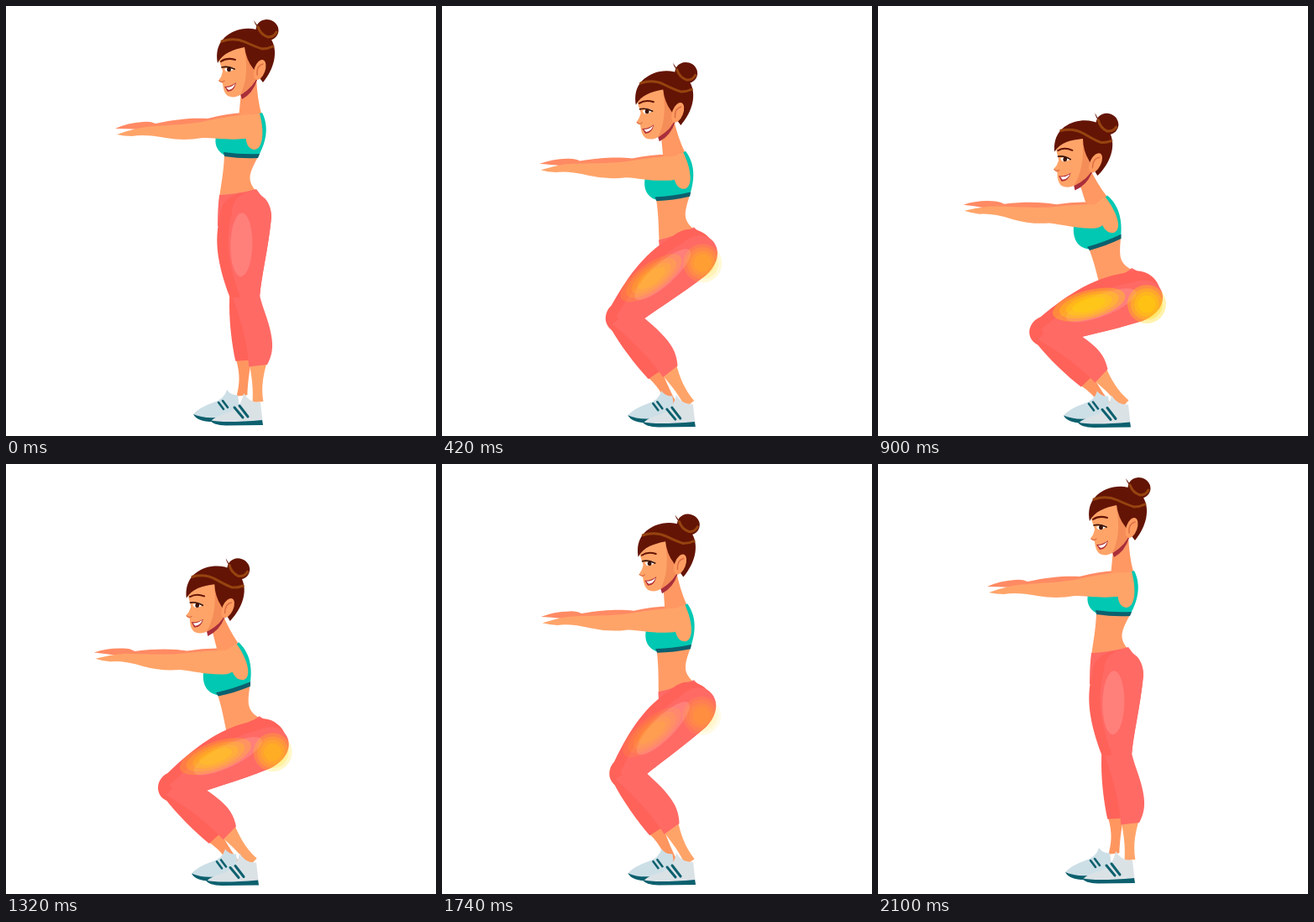
An HTML page with a canvas that plays this animation: 512x512 px, repeating every 2.4 s.

```html
<!DOCTYPE html>
<html lang="en">
<head>
<meta charset="utf-8">
<title>Squat</title>
<style>
html, body { margin: 0; width: 100%; height: 100%; overflow: hidden; background: #fff; }
canvas { display: block; width: 512px; height: 512px; }
</style>
</head>
<body>
<canvas id="stage" width="512" height="512"></canvas>
<script>
const ctx = document.getElementById('stage').getContext('2d');
const LOOP = 2400, STEP = 30, DOWN = 900, RISE = 1200, END = 2100;
const HIP = { x: 286, y: 251 };

const SKIN = '#ffa469', SKIN_FAR = '#ff8a63', SHADE = '#f48d57', HAIR = '#641405', SHINE = '#96430f';
const TEAL = '#00c8b2', DARK = '#0c606e', PANTS = '#ff6a65', PANTS_FAR = '#ff6259';
const LIP = '#b32e33', INK = '#3a1208';

const rad = degrees => degrees * Math.PI / 180;

function fill(color, d) {
  const path = new Path2D(d);
  return () => {
    ctx.fillStyle = color;
    ctx.fill(path);
  };
}

function line(color, width, d) {
  const path = new Path2D(d);
  return () => {
    ctx.strokeStyle = color;
    ctx.lineWidth = width;
    ctx.stroke(path);
  };
}

const oval = (color, x, y, rx, ry, angle = 0) => () => {
  ctx.fillStyle = color;
  ctx.beginPath();
  ctx.ellipse(x, y, rx, ry, rad(angle), 0, 7);
  ctx.fill();
};

const paint = parts => parts.forEach(part => part());

// Runs draw() with the point "from" moved to "to" and turned around it.
function pinned(from, to, degrees, draw) {
  ctx.save();
  ctx.translate(to.x, to.y);
  ctx.rotate(rad(degrees));
  ctx.translate(-from.x, -from.y);
  draw();
  ctx.restore();
}

// Along a bone, x runs from 0 to 100 and positive y is the front of the leg.
function bone(a, b, draw) {
  const dx = b.x - a.x, dy = b.y - a.y;
  ctx.save();
  ctx.translate(a.x, a.y);
  ctx.rotate(Math.atan2(dy, dx));
  ctx.scale(Math.hypot(dx, dy) / 100, 1);
  draw();
  ctx.restore();
}

const farShin = [
  fill('#ff9660', 'M60 19C75 16 85 19 95 24L95 11C80 8 70 4 58 0Z'),
  fill(PANTS_FAR, 'M0 18C20 22 45 22 61 20L62-2L0-2Z')
];
const nearAnkle = [fill(SKIN, 'M66 4C80 3 90 3 103 6L103-7C88-6 75-12 66-17Z')];
const nearShin = [fill(PANTS, 'M0 14C20 8 45 3 68 5L68-17C60-24 52-27 40-26C25-25 15-20 0-18Z')];
const thigh = [
  fill(PANTS_FAR, 'M0 31C30 38 60 33 100 18L100-18C70-20 40-27 0-30C-40-30-40 31 0 31Z'),
  oval(PANTS_FAR, 100, 0, 18, 18),
  fill(PANTS, 'M-5 17C30 25 60 20 104 4L100-18C70-20 40-27 0-30C-40-30-40 17-5 17Z'),
  oval('#ff7f7b', 35, 5, 40, 13)
];

const farShoe = [
  fill('#cddfe6', 'M223 486Q230 478 247 472Q260 468 263 457Q268 464 276 463L280 492L240 493Z'),
  fill(DARK, 'M223 486Q234 491 250 490V495Q228 496 223 486Z'),
  line(DARK, 2.6, 'M253 472l6 8M258 470l6 8')
];
const nearShoe = [
  fill('#dbe2e6', 'M244 494Q250 488 266 484Q280 478 283 461Q290 473 303 472L306 498L250 497Z'),
  fill(DARK, 'M243 493Q258 497 305 493L306 499L262 499.5Q246 499 243 493Z'),
  line(DARK, 3, 'M272 478l10 12M278 476l10 13')
];

const waist = [fill('#ff9c66', 'M260 178C259 200 256 212 254 229L299 222C286 207 289 200 301 178Z')];
const pelvis = [fill(PANTS, 'M254 225Q276 224 298 218C308 230 315 245 315 262L252 262Q252 240 254 225Z')];
const chest = [
  fill('#ff9862', 'M280 102L277 134L304 128Q299 110 298 84Z'),
  fill(SKIN, 'M262 136L303 128Q312 150 301 177H261Z'),
  fill(TEAL, 'M255 143C249 153 245 168 259 177L301 178C309 163 314 145 305 127L302 128C308 150 306 170 296 171C286 170 285 160 285 143Z'),
  fill(DARK, 'M259 174Q280 177 302 176L300 181Q280 182 260 179Z')
];
const farArm = [fill(SKIN_FAR,
  'M130 146Q145 139 163 138Q172 137 178 140C205 134 225 133 240 134Q262 128 285 127V145L180 150L158 147Q142 146 130 146Z')];
const nearArm = [fill(SKIN,
  'M132 153Q146 148 160 145C178 142 215 142 238 137Q270 130 290 129C307 130 306 158 284 158C262 160 250 157 234 157Q212 161 190 157Q165 152 150 155Q140 155 132 153Z')];
const head = [
  fill('#a92e3b', 'M279 105L281 111Q294 104 299 88L297 82Z'),
  fill(SKIN, 'M253 55C252 66 258 74 258 78Q257 84 253 89Q258 91 258 93Q259 103 264 107Q272 111 282 104Q296 94 300 80V45H260Z'),
  fill(SHADE, 'M284 52Q290 84 279 106Q296 96 300 82L296 62Z'),
  fill(HAIR, 'M295 17Q297 24 301 25L299 38H314V20Q304 20 300 24Z'),
  oval(HAIR, 311, 28.5, 13.5, 12.5, 15),
  fill(HAIR, 'M252 68C249 52 254 38 272 30C290 23 308 28 316 40C324 54 320 74 306 91Q302 86 294 74Q286 64 284 49C270 52 258 56 252 68Z'),
  line(SHINE, 3, 'M257 42Q272 37 285 43T305 51Q312 51 318 48M300 25Q303 34 312 37Q319 37 322 31'),
  oval('#ff9c62', 302, 76, 6.5, 12.5, 20),
  line('#dc6e43', 1.5, 'M299 82Q298 71 306 69'),
  line(HAIR, 2, 'M256 66Q263 61 273 64'),
  fill('#fff', 'M260 75Q266 71 272 74Q268 79 262 78Z'),
  oval(INK, 265.5, 75.5, 2.4, 2.7),
  line(INK, 1.7, 'M257 73Q264 71 272 75'),
  line('#db7045', 1.2, 'M254 89Q257 92 260 89'),
  fill(LIP, 'M260 96Q268 96 274 91Q272 102 264 102Z'),
  fill('#fff', 'M262 97Q268 97 273 92.5Q271 99 265 100Z')
];

function glow(x, y, rx, ry, angle, power) {
  for (let size = 1; size > 0.4; size -= 0.18) {
    oval(`rgba(255,215,0,${0.33 * power})`, x, y, rx * size, ry * size, angle)();
  }
}

function draw(time) {
  const t = Math.floor(time % LOOP / STEP) * STEP;
  const rise = end => Math.max(0, (END - t) / (END - end));
  const p = t < DOWN ? t / DOWN : Math.min(1, rise(RISE));
  const power = t < DOWN ? p : rise(DOWN);

  // The hip sinks evenly; a straight knee opens fast, then settles.
  const bend = Math.sin(Math.PI / 2 * p ** 0.6);
  const hip = { x: HIP.x + 18 * p, y: HIP.y + 96 * p * (1.1 - 0.1 * p) };
  const knee = { x: 284 - 84 * bend, y: 346 + 41 * p * (1.5 - 0.5 * p) };
  const ankle = { x: 299 - 8 * bend, y: 468 + 4 * bend };
  const lean = -23 * p;
  const torso = parts => pinned(HIP, hip, lean, () => paint(parts));
  const shoe = (parts, x, y) => pinned({ x: 0, y: 0 }, { x: x * bend, y: y * bend }, 0, () => paint(parts));
  // A joint on the torso that keeps its own angle to the ground.
  const limb = (x, y, dx, dy, turn, parts) => pinned(HIP, hip, lean, () =>
    pinned({ x, y }, { x: x + dx, y: y + dy }, turn - lean, () => paint(parts)));
  const arm = parts => limb(288, 142, -5 * p, 1.5 * p, 6 * p, parts);

  ctx.fillStyle = '#fff';
  ctx.fillRect(0, 0, 512, 512);

  bone(knee, ankle, () => paint(farShin));
  shoe(farShoe, -2, 1.5);
  bone(knee, ankle, () => paint(nearAnkle));
  shoe(nearShoe, -5, 2.5);

  torso(waist);
  torso(pelvis);
  bone(hip, knee, () => paint(thigh));
  bone(knee, ankle, () => paint(nearShin));
  bone(hip, knee, () => glow(47, 11, 40, 17, 7, power));
  glow(hip.x + 16, hip.y + 8, 23, 23, 0, power);

  arm(farArm);
  torso(chest);
  arm(nearArm);
  limb(297, 88, 0, 6 * p, 6 * p * p, head);
}

ctx.lineCap = 'round';
const start = performance.now();
function tick() {
  draw(performance.now() - start);
  requestAnimationFrame(tick);
}
tick();
</script>
</body>
</html>
```
